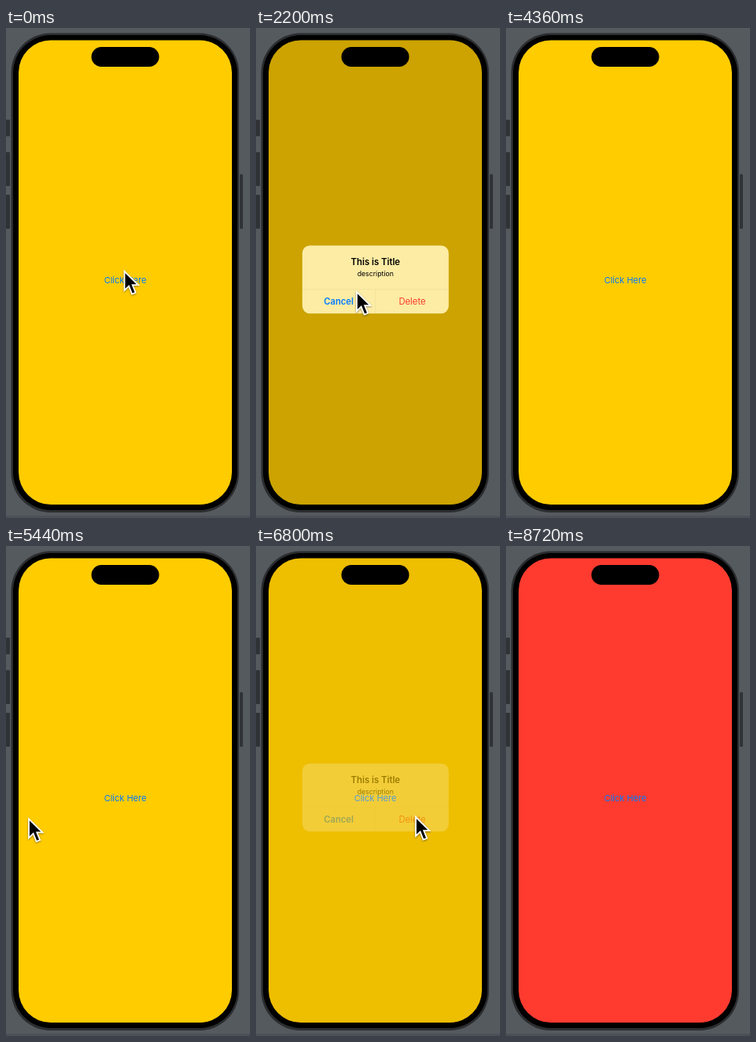
Write an HTML page that moves like this. It is 310 px wide and 620 px high and loops after 9520 ms.

```html
<!DOCTYPE html>
<html lang="en">
<head>
<meta charset="utf-8">
<title>Alert demo</title>
<style>
  html, body { margin: 0; width: 100%; height: 100%; overflow: hidden; background: #555a5f; }
  svg { display: block; width: 100%; height: 100%; }
  text { font-family: Inter, Roboto, "Liberation Sans", sans-serif; text-anchor: middle; }
  .bold { font-weight: 600; }
  #cursor { filter: drop-shadow(0 1.5px 1.2px rgba(0, 0, 0, .4)); }
</style>
</head>
<body>
<svg viewBox="0 0 310 620">
  <defs>
    <clipPath id="glass"><rect x="16" y="15.5" width="271" height="587.5" rx="41"/></clipPath>
  </defs>
  <rect width="310" height="620" fill="#555a5f"/>
  <rect y="617" width="310" height="3" fill="#4e5058"/>

  <g fill="#303336">
    <rect x="0" y="116" width="5" height="21" rx="1"/>
    <rect x="0" y="157" width="5" height="43" rx="1"/>
    <rect x="0" y="211" width="5" height="43" rx="1"/>
    <rect x="297" y="185" width="4" height="69" rx="1"/>
  </g>
  <rect x="6.5" y="6.5" width="289.5" height="606.5" rx="50" fill="#2b2d2f"/>
  <rect x="9" y="9" width="285" height="601" rx="48" fill="#000"/>

  <g clip-path="url(#glass)">
    <rect id="screen" x="15" y="14" width="273" height="590"/>
    <text id="link" x="151.5" y="322.5" font-size="11" fill="#007aff">Click Here</text>
    <rect id="dim" x="15" y="14" width="273" height="590" fill="#000"/>
    <g id="alert">
      <rect x="-93" y="-43" width="186" height="86" rx="9.5" fill="#fceca4"/>
      <path d="M-93 12.5H93M0 12.5V43" stroke="#000" stroke-opacity=".07" stroke-width=".7"/>
      <text class="bold" y="-18" font-size="11.3">This is Title</text>
      <text y="-4" font-size="8.75">description</text>
      <text class="bold" x="-46.7" y="32" font-size="11.2" fill="#007aff">Cancel</text>
      <text x="46.7" y="32" font-size="11.3" fill="#ff3b30">Delete</text>
    </g>
  </g>
  <rect x="108.5" y="24" width="86" height="25" rx="12.5" fill="#000"/>

  <circle id="touch" r="20.5" fill="#ff9f2e"/>
  <path id="cursor" d="M0 0V24L5.6 18.6L9.6 28.6L14.2 26.8L10.2 17.1H17.4Z"
        fill="#000" stroke="#fff" stroke-width="1.8" stroke-linejoin="miter"/>
</svg>

<script>
const LOOP = 9520;
const STEP = 40;
const RED_AT = 7000;
const SPRING = 0.015;

// Time, x and y of the pointer tip
const path = [
  [0, 150.5, 308], [1100, 150.5, 315.5], [1700, 150.5, 315.5], [2520, 116.5, 343.5],
  [3240, 116.5, 343.5], [3840, -30, 380], [5200, -30, 360], [5840, 156.5, 313.5],
  [6120, 156.5, 313.5], [6500, 203, 343], [6850, 203, 343], [7200, 210.5, 336], [7700, -30, 330]
];
const alerts = [{ open: 1225, close: 3127 }, { open: 5988, close: 6650 }];
const taps = alerts.flatMap(a => [a.open, a.close]);

const el = id => document.getElementById(id);
const [screen, link, dim, alertBox, touch, cursor] =
  ["screen", "link", "dim", "alert", "touch", "cursor"].map(el);

const clamp = v => Math.max(0, Math.min(1, v));
const ease = v => v * v * (3 - 2 * v);

function spring(ms) {
  if (ms <= 0) return 0;
  const v = ms * SPRING;
  return v > 9 ? 1 : 1 - (1 + v) * Math.exp(-v);
}

function pointer(t) {
  const i = path.findIndex(p => p[0] > t);
  if (i < 0) return path[path.length - 1].slice(1);
  const a = path[i - 1], b = path[i];
  const k = ease((t - a[0]) / (b[0] - a[0]));
  return [a[1] + (b[1] - a[1]) * k, a[2] + (b[2] - a[2]) * k];
}

function touchAlpha(t) {
  return Math.max(...taps.map(s =>
    0.6 * clamp((t - s + 130) / 60) * clamp((s + 130 - t) / 130)));
}

function draw(t) {
  const a = alerts[t < 4500 ? 0 : 1];
  const shown = spring(t - a.open);
  const level = shown * (1 - spring(t - a.close));
  const pressed = t < a.close ? clamp((t - a.open + 130) / 100) : 0;
  const [x, y] = pointer(t);

  screen.setAttribute("fill", t < RED_AT ? "#ffcc00" : "#ff3b30");
  link.setAttribute("opacity", 1 - 0.9 * pressed);
  dim.setAttribute("opacity", 0.2 * level);
  alertBox.setAttribute("opacity", level);
  alertBox.setAttribute("transform", `translate(151.8 318.2) scale(${1.2 - 0.2 * shown})`);
  touch.setAttribute("transform", `translate(${x + 1} ${y + 2})`);
  touch.setAttribute("opacity", touchAlpha(t));
  cursor.setAttribute("transform", `translate(${x} ${y})`);
}

const start = performance.now();
function tick() {
  const t = (performance.now() - start) % LOOP;
  draw(Math.floor(t / STEP) * STEP);
  requestAnimationFrame(tick);
}
draw(0);
requestAnimationFrame(tick);
</script>
</body>
</html>
```
